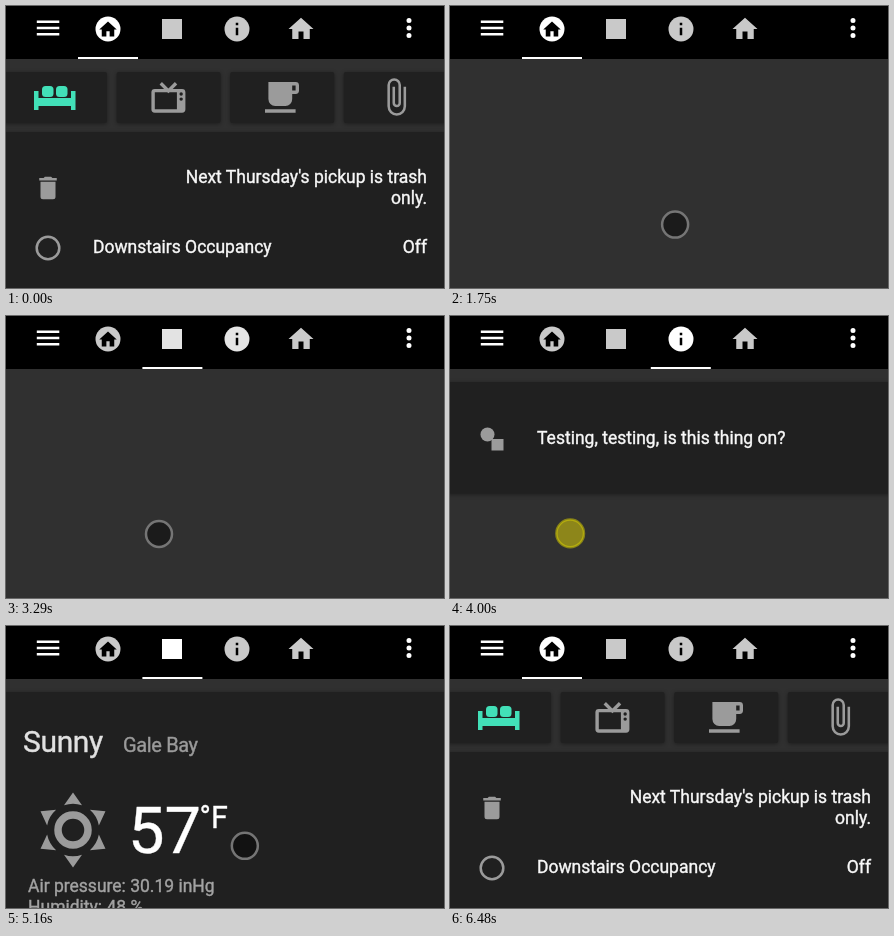
Recreate the animation shown at these times as an HTML page. Size 438 by 282 pixels, loop 7.96 s.

```html
<!DOCTYPE html>
<html lang="en">
<head>
<meta charset="utf-8">
<title>Swipe navigation</title>
<style>
  html, body { margin: 0; width: 100%; height: 100%; overflow: hidden; background: #303030; }
  svg { display: block; width: 100vw; height: 100vh; }
  text { font: 17.5px Roboto, sans-serif; color: #f8f8f8; fill: currentColor; stroke: currentColor; stroke-width: .4px; }
  .card { fill: #202020; filter: drop-shadow(0 1px 2px rgba(0, 0, 0, .4)); }
  .icon { fill: #9b9b9b; }
  .line { fill: none; stroke: #9b9b9b; }
  .dim { color: #a3a3a3; }
  .end { text-anchor: end; }
  .title { font-size: 30px; color: #e1e1e1; letter-spacing: -.36px; }
  .name { font-size: 20px; color: #9b9b9b; letter-spacing: -.36px; }
  .temp { font-size: 65px; color: #fff; }
  .unit { font-size: 30.5px; color: #fff; }
  .white { fill: #fff; }
</style>
</head>
<body>
<svg viewBox="0 0 438 282">
  <rect width="438" height="282" fill="#303030"/>

  <g class="page">
    <g id="buttons"></g>
    <g fill="#42e0b8">
      <path d="M28 85h4.5v7h32.5v-7h4.5v19h-4.5v-4h-32.5v4h-4.5z"/>
      <rect x="36" y="80" width="11.5" height="11" rx="3.5"/>
      <rect x="50" y="80" width="11.5" height="11" rx="3.5"/>
    </g>
    <g transform="translate(142 71) scale(1.7)">
      <rect class="line" x="3" y="8" width="18" height="12" rx="1" stroke-width="2"/>
      <path class="icon" d="M17 8h4v12h-4z"/>
      <path class="line" stroke-width="2" d="M7.5 3.7L12 8.2l4.5-4.5"/>
      <circle cx="19.5" cy="10" r="1" fill="#202020"/>
      <circle cx="19.5" cy="13" r="1" fill="#202020"/>
    </g>
    <path class="icon" fill-rule="evenodd" transform="translate(255.6 71) scale(1.7)"
      d="M2 21h18v-2H2zM20 3H4v10a4 4 0 0 0 4 4h6a4 4 0 0 0 4-4v-3h2a2 2 0 0 0 2-2V5a2 2 0 0 0-2-2zM20 8h-2V5h2z"/>
    <path class="line" stroke-width="1.5" transform="translate(369.5 70.6) scale(1.7)"
      d="M17.25 6v11.5a4.75 4.75 0 0 1-9.5 0V5a3.25 3.25 0 0 1 6.5 0v10.5a1.75 1.75 0 0 1-3.5 0V6"/>
    <rect class="card" x="-3" y="126" width="444" height="170"/>
    <path class="icon" transform="translate(27 167) scale(1.25)"
      d="M19 4h-3.5l-1-1h-5l-1 1H5v2h14zM6 19a2 2 0 0 0 2 2h8a2 2 0 0 0 2-2V7H6z"/>
    <circle class="line" cx="42" cy="242" r="11.3" stroke-width="2.5"/>
    <text class="end" x="421" y="177">Next Thursday's pickup is trash</text>
    <text class="end" x="421" y="198">only.</text>
    <text x="87" y="247">Downstairs Occupancy</text>
    <text class="end" x="421" y="247">Off</text>
  </g>

  <g class="page">
    <rect class="card" x="-3" y="66" width="444" height="230"/>
    <text class="title" x="17" y="126">Sunny</text>
    <text class="name" x="117" y="126">Gale Bay</text>
    <g id="sun" transform="translate(67 204) scale(3.75)">
      <circle class="line" r="4" stroke-width="2"/>
    </g>
    <text class="temp" x="122" y="227">57</text>
    <text class="unit" x="193.5" y="202">°F</text>
    <text class="dim" x="22" y="266">Air pressure: 30.19 inHg</text>
    <text class="dim" x="22" y="287">Humidity: 48 %</text>
  </g>

  <g class="page">
    <rect class="card" x="-3" y="66" width="444" height="111.5"/>
    <circle class="icon" cx="37.5" cy="118.5" r="7"/>
    <path class="icon" d="M41.5 123h12v11.5h-12z"/>
    <text x="87" y="128">Testing, testing, is this thing on?</text>
  </g>

  <rect width="438" height="53"/>
  <path stroke="#fff" stroke-width="2.5" d="M30.8 15.8h22.5M30.8 22h22.5M30.8 28.2h22.5"/>
  <path stroke="#fff" stroke-width="5" stroke-linecap="round" d="M403 14.5h0M403 22h0M403 29.5h0"/>
  <g class="tab white" transform="translate(102 23) scale(1.25)">
    <circle r="10"/>
    <path fill="#000" d="M0-6L-7 .3h2V6h3.7V1.7h2.6V6H5V.3h2z"/>
  </g>
  <g class="tab white"><rect x="156" y="13" width="20" height="20"/></g>
  <g class="tab white" transform="translate(231 23) scale(1.25)">
    <circle r="10"/>
    <path fill="#000" d="M-1-5h2v2h-2zM-1-1h2v6h-2z"/>
  </g>
  <g class="tab white" transform="translate(280 8) scale(1.25)">
    <path d="M10 20v-6h4v6h5v-8h3L12 3 2 12h3v8z"/>
  </g>
  <rect id="bar" class="white" y="51" height="2"/>
  <circle id="cursor" r="13" stroke-width="2.5"/>
</svg>

<script>
const LOOP = 7960, FRAME = 230 / 3, SLIDE = 292, TAB_PITCH = 64.4;
const PRESS_LEAD = 250, EXIT_DELAY = 45, EXIT_TIME = 100, ENTER_DELAY = 370, ENTER_TIME = 200;

// The screen refreshes every FRAME ms, counted anew from each of these times.
const refreshStarts = [350, 1060, 2750, 3920, 5710];

// The cursor rests between moves; a swipe drags one page ahead (1) or back (-1).
const moves = [
  { at: 340, time: 240, x: 355, y: 223 },
  { at: 980, time: 450, x: 72, y: 232, swipe: 1 },
  { at: 1500, time: 600, x: 289, y: 213 },
  { at: 2505, time: 10, x: 329, y: 204 },
  { at: 2760, time: 140, x: 153, y: 218, swipe: 1 },
  { at: 3900, time: 280, x: 98, y: 217 },
  { at: 4230, time: 233, x: 307, y: 224, swipe: -1 },
  { at: 5080, time: 300, x: 110, y: 212 },
  { at: 5540, time: 244, x: 295, y: 208, swipe: -1 },
  { at: 6190, time: 280, x: 310, y: 300 }
];
const cursorStart = { x: 367, y: 300 };

const swipes = moves.filter(move => move.swipe);
let pageIndex = 0;
for (const swipe of swipes) {
  swipe.from = pageIndex;
  swipe.to = pageIndex += swipe.swipe;
  swipe.exit = swipe.at + swipe.time + EXIT_DELAY;
  swipe.enter = swipe.exit + ENTER_DELAY;
  swipe.tabChange = swipe.enter - 85;
}

const pages = [...document.querySelectorAll(".page")];
const tabs = [...document.querySelectorAll(".tab")];
const bar = document.getElementById("bar");
const cursor = document.getElementById("cursor");

function set(el, attrs) {
  for (const key in attrs) el.setAttribute(key, attrs[key]);
}
function add(parent, tag, attrs) {
  const el = document.createElementNS("http://www.w3.org/2000/svg", tag);
  set(el, attrs);
  document.getElementById(parent).append(el);
}

for (let i = 0; i < 4; i++)
  add("buttons", "rect", { class: "card", x: -3 + 113.6 * i, y: 66, width: 104, height: 51, rx: 2 });
for (let i = 0; i < 6; i++)
  add("sun", "path", { class: "icon", d: "M0-10L2.4-6.58Q0-7.4-2.4-6.58z", transform: `rotate(${60 * i})` });

const mix = (a, b, k) => a + (b - a) * k;
const ramp = (t, start, length) => Math.min(1, Math.max(0, (t - start) / length));

// Same curve as the CSS "ease" keyword.
function ease(x) {
  const bezier = (s, a, b) => 3 * s * (1 - s) * ((1 - s) * a + s * b) + s ** 3;
  let low = 0, high = 1;
  for (let i = 0; i < 20; i++) {
    const mid = (low + high) / 2;
    if (bezier(mid, .25, .25) < x) low = mid; else high = mid;
  }
  return bezier(high, .1, 1);
}

function lastRefresh(t) {
  const start = refreshStarts.filter(s => s <= t).pop() || 0;
  return start + FRAME * Math.floor((t - start + 10) / FRAME);
}

function drawPages(t) {
  const swipe = swipes.filter(s => t >= s.exit).pop();
  const entering = swipe && t >= swipe.enter;
  const current = !swipe ? 0 : entering ? swipe.to : swipe.from;
  const hidden = !swipe ? 0
    : entering ? 1 - ease(ramp(t, swipe.enter, ENTER_TIME))
    : ease(ramp(t, swipe.exit, EXIT_TIME));
  const side = !swipe ? 0 : entering ? swipe.swipe : -swipe.swipe;
  pages.forEach((page, i) => page.style.display = i === current ? "" : "none");
  set(pages[current], { transform: `translate(${SLIDE * side * hidden} 0)`, opacity: 1 - hidden });
}

function drawTabs(t) {
  const { tabChange, from, to } = swipes.filter(s => t >= s.tabChange).pop()
    || { tabChange: -LOOP, from: 0, to: 0 };
  const fade = ramp(t, tabChange, 110);
  tabs.forEach((tab, i) => {
    const level = i === to ? fade : i === from ? 1 - fade : 0;
    tab.setAttribute("opacity", mix(.79, 1, level));
  });
  const lead = mix(from, to, ramp(t, tabChange + 60, 110));
  const trail = mix(from, to, ramp(t, tabChange + 170, 110));
  set(bar, { x: 72 + TAB_PITCH * Math.min(lead, trail), width: 60 + TAB_PITCH * Math.abs(lead - trail) });
}

function drawCursor(t) {
  let { x, y } = cursorStart;
  for (const move of moves) {
    const k = ease(ramp(t, move.at, move.time));
    x = mix(x, move.x, k);
    y = mix(y, move.y, k);
  }
  const pressed = swipes.some(s => t >= s.at - PRESS_LEAD && t < s.at + s.time - 10);
  set(cursor, {
    cx: x,
    cy: y,
    r: pressed ? 13.8 : 13,
    fill: pressed ? "rgba(255,240,0,.45)" : "rgba(0,0,0,.43)",
    stroke: pressed ? "rgba(220,210,0,.5)" : "#757575"
  });
}

function draw(now) {
  const t = lastRefresh(now % LOOP);
  drawPages(t);
  drawTabs(t);
  drawCursor(t);
  requestAnimationFrame(draw);
}
draw(0);
</script>
</body>
</html>
```
